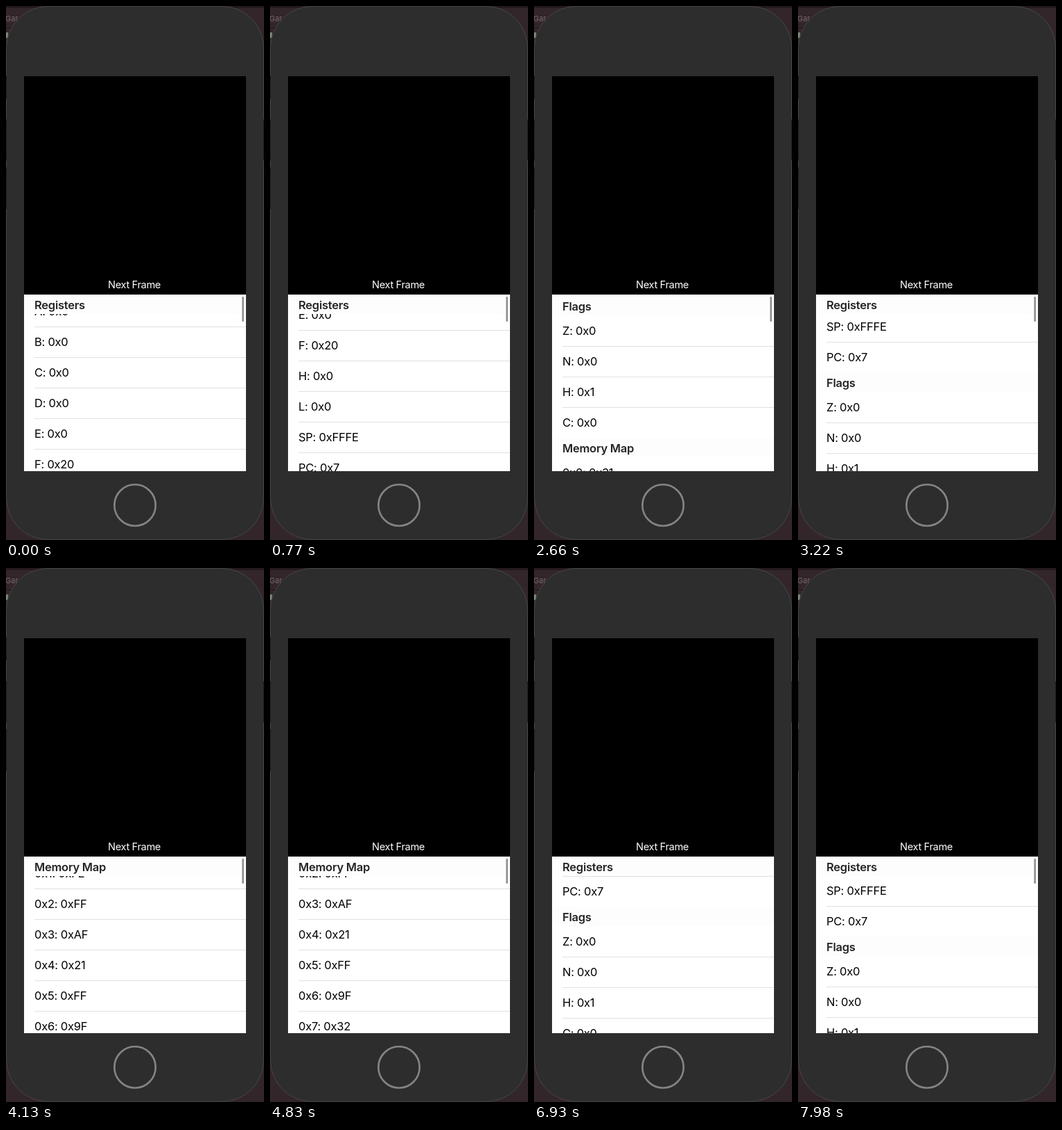
Recreate the animation shown at these times as an HTML page with a canvas. Size 372 px wide and 768 px high, loop 8000 ms.

```html
<!DOCTYPE html>
<html lang="en">
<head>
<meta charset="utf-8">
<title>Debugger table</title>
<style>
html, body { margin: 0; width: 100%; height: 100%; overflow: hidden; background: #2d2d2d; }
canvas { display: block; }
</style>
</head>
<body>
<canvas id="stage" width="372" height="768"></canvas>
<script>
const ctx = document.getElementById('stage').getContext('2d');
const LOOP = 8000, STEP = 70;
const LEFT = 26, RIGHT = 346, TOP = 415, BOTTOM = 669, INSET = 41;
const HEADER = 28, ROW = 44;

const bootRom = ('31 FE FF AF 21 FF 9F 32 CB 7C 20 FB 21 26 FF E 11 3E 80 32 ' +
  'E2 C 3E F3').split(' ');
const sections = [
  { title: 'Registers', rows: ['A: 0x0', 'B: 0x0', 'C: 0x0', 'D: 0x0', 'E: 0x0',
    'F: 0x20', 'H: 0x0', 'L: 0x0', 'SP: 0xFFFE', 'PC: 0x7'] },
  { title: 'Flags', rows: ['Z: 0x0', 'N: 0x0', 'H: 0x1', 'C: 0x0'] },
  { title: 'Memory Map',
    rows: bootRom.map((v, i) => `0x${i.toString(16).toUpperCase()}: 0x${v}`) }
];

// [time, scroll offset]
const knots = [[0, 26], [840, 214], [1400, 364], [1470, 364], [1540, 368], [2100, 470],
  [2590, 470], [3220, 356], [3430, 372], [4130, 742], [4550, 764], [4690, 764],
  [4830, 786], [5390, 880], [5600, 740], [5880, 426], [6020, 408], [6090, 408],
  [6370, 396], [7490, 396], [7980, 353], [8000, 353]];

const slope = i => knots[i + 1]
  ? (knots[i + 1][1] - knots[i][1]) / (knots[i + 1][0] - knots[i][0]) : 0;

function tangent(i) {
  if (i === 0) return slope(0);
  const a = slope(i - 1), b = slope(i);
  return a * b > 0 ? 2 * a * b / (a + b) : 0;
}

// Monotone cubic through the knots
function scrollAt(t) {
  let i = 0;
  while (i < knots.length - 2 && knots[i + 1][0] <= t) i++;
  const [t0, s0] = knots[i], [t1, s1] = knots[i + 1];
  const h = t1 - t0, u = (t - t0) / h, v = 1 - u;
  return Math.round(s0 * v * v * (1 + 2 * u) + s1 * u * u * (1 + 2 * v) +
    h * u * v * (tangent(i) * v - tangent(i + 1) * u));
}

function barAlpha(t) {
  if (t >= 2240 && t < 2660) return 0;
  if (t >= 6790 && t < 7560) return Math.max(0, 1 - (t - 6720) / 210);
  return 1;
}

function rect(x, y, w, h, color) {
  ctx.fillStyle = color;
  ctx.fillRect(x, y, w, h);
}

function text(str, x, y, color, weight = 400, size = 16.5, spacing = -0.25) {
  ctx.font = `${weight} ${size}px Inter, sans-serif`;
  ctx.letterSpacing = spacing + 'px';
  ctx.fillStyle = color;
  ctx.fillText(str, x, y);
}

function drawPhone() {
  rect(0, 0, 372, 768, '#33262b');
  rect(0, 0, 372, 3, '#241a1e');
  rect(0, 31, 12, 1, '#1d1518');
  rect(0, 38, 3, 8, '#7c8577');
  text('Gar', -1, 22, '#75696d', 400, 11, 0);

  ctx.beginPath();
  ctx.roundRect(0.5, 0.5, 371, 767, 60);
  ctx.fillStyle = '#2d2d2d';
  ctx.fill();
  ctx.strokeStyle = '#464646';
  ctx.lineWidth = 1;
  ctx.stroke();
  for (const [y, h] of [[100, 33], [163, 59], [232, 60]]) rect(0, y, 1, h, '#1c1c1c');
  rect(371, 163, 1, 59, '#1c1c1c');

  ctx.beginPath();
  ctx.arc(186, 718, 29.7, 0, 2 * Math.PI);
  ctx.strokeStyle = '#858585';
  ctx.lineWidth = 2.6;
  ctx.stroke();

  rect(LEFT, 101, RIGHT - LEFT, TOP - 101, '#000');
  text('Next Frame', 147, 405.5, '#fff', 400, 14.6, -0.35);
}

function drawHeader(title, y) {
  rect(LEFT, y, RIGHT - LEFT, HEADER, '#fdfdfd');
  text(title, INSET, y + 21, '#242424', 600);
}

function drawTable(scroll) {
  let y = TOP - scroll;
  const headers = [];
  for (const { title, rows } of sections) {
    const end = y + HEADER + rows.length * ROW;
    headers.push([title, Math.max(y, Math.min(TOP, end - HEADER))]);
    rows.forEach((label, i) => {
      const top = y + HEADER + i * ROW;
      text(label, INSET, top + 28, '#000');
      if (i < rows.length - 1) rect(INSET, top + ROW, RIGHT - INSET, 1, '#e1e1e3');
    });
    y = end;
  }
  for (const [title, top] of headers) drawHeader(title, top);
}

function draw(t) {
  drawPhone();
  ctx.save();
  ctx.beginPath();
  ctx.rect(LEFT, TOP, RIGHT - LEFT, BOTTOM - TOP);
  ctx.clip();
  rect(LEFT, TOP, RIGHT - LEFT, BOTTOM - TOP, '#fff');
  drawTable(scrollAt(t));
  ctx.globalAlpha = barAlpha(t);
  ctx.beginPath();
  ctx.roundRect(340.3, 418, 2.7, 36, 1.3);
  ctx.fillStyle = '#929292';
  ctx.fill();
  ctx.restore();
}

function tick() {
  const t = performance.now() % LOOP;
  draw(Math.floor(t / STEP) * STEP);
  requestAnimationFrame(tick);
}
tick();
</script>
</body>
</html>
```
